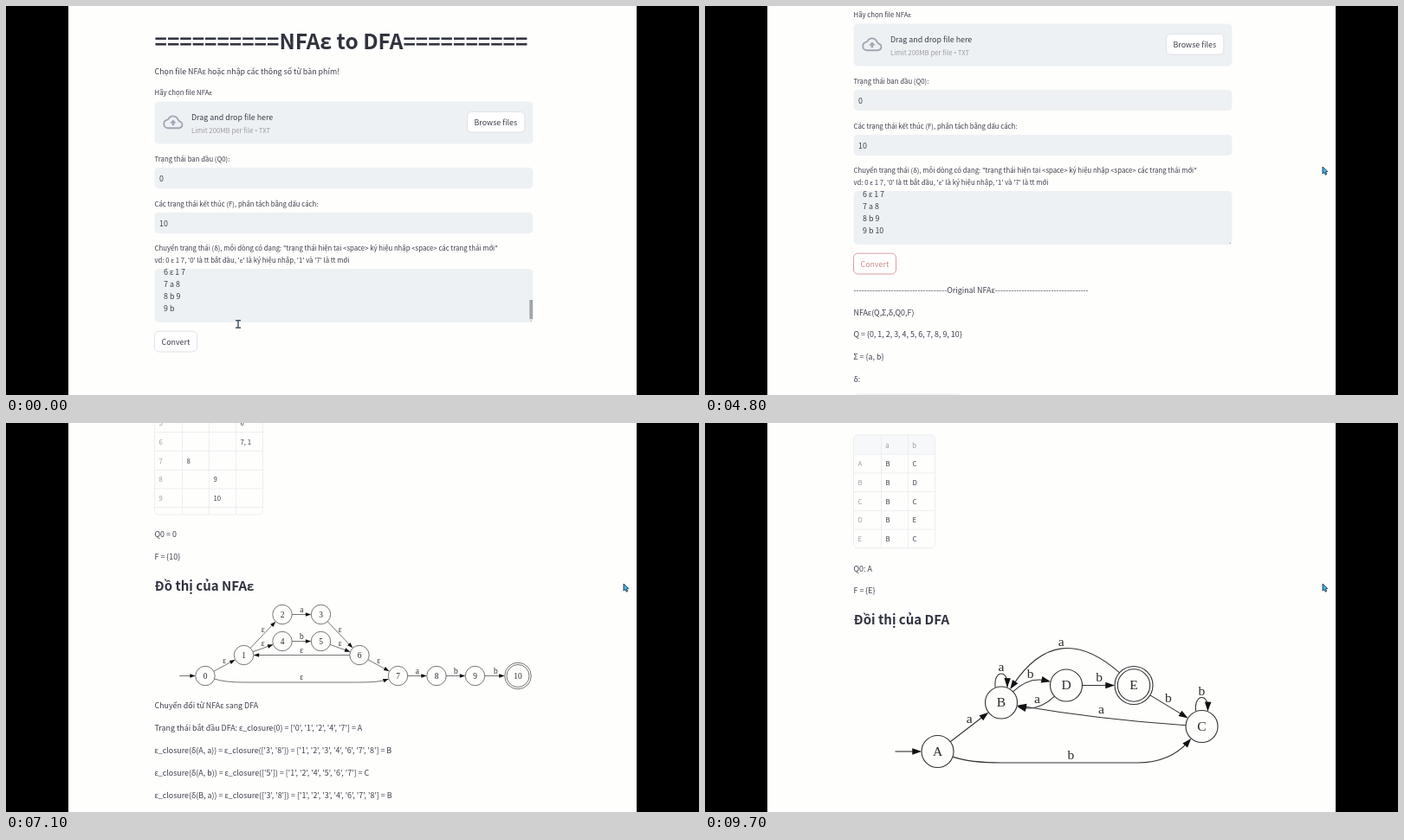
These frames come from a looping animation (800x450 px, 10000 ms). An HTML page with a canvas:

```html
<!DOCTYPE html>
<html lang="vi">
<head>
<meta charset="utf-8">
<title>NFAε to DFA</title>
<style>
html, body { margin: 0; width: 100%; height: 100%; overflow: hidden; background: #000; }
canvas { display: block; width: 800px; height: 450px; }
</style>
</head>
<body>
<canvas id="stage" width="800" height="450"></canvas>
<script>
const ctx = document.getElementById('stage').getContext('2d');

const LOOP = 10000, STEP = 100;
const SANS = '"Noto Sans CJK JP", "Noto Sans CJK SC", "Noto Sans CJK KR", "Noto Sans", sans-serif';
const GREEK = '"Noto Sans", "Open Sans", sans-serif';
const SERIF = '"Liberation Serif", serif';
const BODY = 8.88, SMALL = 7.77, LINE = 25.8, LEFT = 171.5, WIDTH = 437;
const INK = '#3c3e49', DARK = '#31333f', MUTED = '#9c9da5', FIELD = '#eef1f4';
const PAPER = '#fefefd', RULE = '#e9eaec', OUTLINE = '#d9dbe1', ACCENT = '#cb8a88';

// Key points: time followed by values
const scrollKeys = [[4540, 0], [5600, 368], [7050, 681], [7340, 681], [9500, 1425]];
const mouseKeys = [[1950, 268, 368], [2700, 188, 387], [3150, 188, 387], [3600, 701, 200.5], [4300, 712.5, 185.5]];

function at(keys, t) {
  const next = keys.findIndex(k => k[0] > t);
  if (next < 1) return keys[next ? keys.length - 1 : 0].slice(1);
  const [a, b] = [keys[next - 1], keys[next]];
  const k = (t - a[0]) / (b[0] - a[0]);
  return a.slice(1).map((v, i) => v + (b[i + 1] - v) * k);
}

// Automata: the tables, the closure steps and both graphs follow from these moves
const moves = { 0: { ε: '7, 1' }, 1: { ε: '4, 2' }, 2: { a: '3' }, 3: { ε: '6' }, 4: { b: '5' }, 5: { ε: '6' },
  6: { ε: '7, 1' }, 7: { a: '8' }, 8: { b: '9' }, 9: { b: '10' } };

const targets = (state, symbol) => moves[state]?.[symbol]?.split(', ') ?? [];
const show = set => '[' + set.map(s => `'${s}'`).join(', ') + ']';

function closure(set) {
  const all = new Set(set);
  for (const s of all) targets(s, 'ε').forEach(n => all.add(n));
  return [...all].sort();
}

function convert() {
  const found = [closure(['0'])], steps = [], rows = [];
  const nameOf = set => {
    let i = found.findIndex(f => show(f) === show(set));
    if (i < 0) i = found.push(set) - 1;
    return 'ABCDE'[i];
  };
  for (const set of found) {
    const row = [nameOf(set)];
    for (const symbol of 'ab') {
      const reached = set.flatMap(s => targets(s, symbol)).sort();
      const closed = closure(reached), name = nameOf(closed);
      steps.push(`ε_closure(δ(${row[0]}, ${symbol})) = ε_closure(${show(reached)}) = ${show(closed)} = ${name}`);
      row.push(name);
    }
    rows.push(row);
  }
  return { steps, rows };
}

const dfa = convert();
const nfaRows = Object.keys(moves).map(s => [s, ...[...'abε'].map(c => moves[s][c] ?? '')]);
const edgesOf = rows => rows.flatMap(([from, ...cells]) =>
  cells.flatMap((cell, i) => cell ? cell.split(', ').map(to => [from, to, 'abε'[i]]) : []));

// Vertically centred text; Greek letters come from a proportional face
function text(str, x, cy, size = BODY, color = INK, weight = 400) {
  ctx.fillStyle = color;
  ctx.textAlign = 'left';
  for (const part of str.split(/([\u0370-\u03ff\u2022]+)/)) {
    if (!part) continue;
    ctx.font = `${weight} ${size}px ${/[\u0370-\u03ff\u2022]/.test(part) ? GREEK : SANS}`;
    ctx.fillText(part, x, cy + size * 0.397);
    x += ctx.measureText(part).width;
  }
  return x;
}

const lines = (y, rows) => rows.forEach((s, i) => text(s, LEFT, y + LINE * i));

function box(x, y, w, h, fill, stroke) {
  ctx.beginPath();
  ctx.roundRect(x, y, w, h, 5);
  if (fill) { ctx.fillStyle = fill; ctx.fill(); }
  if (stroke) { ctx.strokeStyle = stroke; ctx.lineWidth = 0.8; ctx.stroke(); }
}

function button(str, x, y, w, color, border) {
  box(x, y, w, 23.8, '#fff', border);
  text(str, x + 8, y + 12, BODY, color);
}

const field = (y, h) => box(LEFT, y, WIDTH, h, FIELD);

function cloud(x, y) {
  ctx.save();
  ctx.translate(x, y);
  ctx.strokeStyle = ctx.fillStyle = '#a0a6b4';
  ctx.lineWidth = 1.9;
  ctx.beginPath();
  ctx.arc(-5.8, 2, 4.8, Math.PI / 2, Math.PI * 1.45);
  ctx.arc(0, -1, 6, Math.PI * 1.15, Math.PI * 1.9);
  ctx.arc(6.7, 2.9, 3.9, -Math.PI * 0.45, Math.PI / 2);
  ctx.closePath();
  ctx.stroke();
  ctx.fillRect(-1.3, 0, 2.6, 3.8);
  ctx.beginPath();
  ctx.moveTo(-3.8, 1);
  ctx.lineTo(0, -2.8);
  ctx.lineTo(3.8, 1);
  ctx.fill();
  ctx.restore();
}

function form(t) {
  const bar = '='.repeat(10), hot = t >= 2600;
  text(bar + 'NFAε to DFA' + bar, LEFT, 40.8, 24.4, DARK, 700);
  text('Chọn file NFAε hoặc nhập các thông số từ bàn phím!', LEFT, 75);
  text('Hãy chọn file NFAε', LEFT, 100.3, SMALL);
  field(110.5, 49);
  cloud(192.9, 134.4);
  text('Drag and drop file here', 214, 128);
  text('Limit 200MB per file • TXT', 214, 143.5, SMALL, MUTED);
  button('Browse files', 532.5, 122.3, 66.3, INK, OUTLINE);

  text('Trạng thái ban đầu (Q0):', LEFT, 176.6, SMALL);
  field(186.8, 24.4);
  text('0', 177, 199);
  text('Các trạng thái kết thúc (F), phân tách bằng dấu cách:', LEFT, 228.7, SMALL);
  field(238.8, 24.4);
  text('10', 177, 251);
  text('Chuyển trạng thái (δ), mỗi dòng có dạng: "trạng thái hiện tại <space> ký hiệu nhập <space> các trạng thái mới"',
    LEFT, 280.4, SMALL);
  text("vd: 0 ε 1 7, '0' là tt bắt đầu, 'ε' là ký hiệu nhập, '1' và '7' là tt mới", LEFT, 294.4, SMALL);
  editor(t);
  button('Convert', LEFT, 376.2, 49, hot ? ACCENT : INK, hot ? ACCENT : OUTLINE);
}

function editor(t) {
  field(304, 62);
  ctx.save();
  ctx.beginPath();
  ctx.rect(LEFT, 304, WIDTH, 62);
  ctx.clip();
  const typed = '9 b 10'.slice(0, t < 100 ? 3 : t < 200 ? 5 : 6);
  let end = 0;
  ['6 ε 1 7', '7 a 8', '8 b 9', typed].forEach((s, i) => { end = text(s, 182, 307.6 + 13.9 * i); });
  const blinkOn = Math.floor((t - 100) / 500) % 2 === 0;
  if (t >= 100 && t < 2000 && blinkOn) {
    ctx.fillStyle = DARK;
    ctx.fillRect(end + 0.3, 344, 0.7, 11);
  }
  ctx.restore();
  ctx.fillStyle = '#a3a5a9';
  if (t < 4300) ctx.fillRect(604.3, 340, 3.8, 22.3);
  ctx.fillRect(605.5, 364, 1.5, 1);
}

function table(y, heads, rows, height) {
  const rowH = 21.72, headH = 22.5, colX = i => i ? 172.5 + 31 * i : LEFT;
  const w = colX(heads.length + 1) - LEFT;
  height ??= headH + rowH * rows.length;
  ctx.save();
  ctx.beginPath();
  ctx.roundRect(LEFT, y, w, height, 5);
  ctx.clip();
  ctx.fillStyle = '#f7f8fa';
  ctx.fillRect(LEFT, y, w, headH);
  ctx.fillStyle = RULE;
  heads.forEach((_, i) => ctx.fillRect(colX(i + 1) - 0.4, y, 0.8, height));
  for (let i = 0; i <= rows.length; i++) ctx.fillRect(LEFT, y + headH + rowH * i - 0.4, w, 0.8);
  heads.forEach((h, i) => text(h, colX(i + 1) + 4.8, y + 12, SMALL, MUTED));
  rows.forEach((row, r) => row.forEach((cell, c) =>
    text(cell, colX(c) + 5, y + 33.5 + rowH * r, SMALL, c ? INK : MUTED)));
  ctx.restore();
  box(LEFT, y, w, height, null, RULE);
}

function results() {
  const dashes = '-'.repeat(35), title = (s, y) => text(s, LEFT, y, 15, DARK, 600);
  lines(418.2, [dashes + 'Original NFAε' + dashes, 'NFAε(Q,Σ,δ,Q0,F)',
    'Q = {0, 1, 2, 3, 4, 5, 6, 7, 8, 9, 10}', 'Σ = {a, b}', 'δ:']);
  table(539, ['a', 'b', 'ε'], nfaRows, 248);
  lines(809.8, ['Q0 = 0', 'F = {10}']);
  title('Đồ thị của NFAε', 868.8);
  graph(nfaGraph);
  lines(1007.8, ['Chuyển đổi từ NFAε sang DFA',
    `Trạng thái bắt đầu DFA: ε_closure(0) = ${show(closure(['0']))} = A`, ...dfa.steps,
    dashes + 'Converted DFA' + dashes, 'DFA(Q,Σ,δ,Q0,F)', 'Q = {A, B, C, D, E}', 'Σ = {a, b}', 'δ:']);
  table(1438.7, ['a', 'b'], dfa.rows);
  lines(1593, ['Q0: A', 'F = {E}']);
  title('Đồi thị của DFA', 1652);
  graph(dfaGraph);
}

// Graphs: bends are in node radii, positive to the left of travel; runs are level stretches at a given height
const column = (i, y) => [230 + 44.5 * i, y];
const nfaGraph = {
  top: 681, r: 11.2, start: '0', final: '10', finalR: 15.3, edges: edgesOf(nfaRows), bends: {}, runs: { 0: 300 },
  nodes: { 0: column(0, 292.5), 1: column(1, 268.5), 2: column(2, 221.5), 3: column(3, 221.5),
    4: column(2, 252.5), 5: column(3, 252.5), 6: column(4, 268.5), 7: column(5, 292.5),
    8: column(6, 292.5), 9: column(7, 292.5), 10: [591, 292.5] }
};
nfaGraph.runs = { '0-7': 300 };
const dfaGraph = {
  top: 1425, r: 18.5, start: 'A', final: 'E', finalR: 22, edges: edgesOf(dfa.rows),
  bends: { 'B-D': 1.13, 'D-B': 1.13, 'E-B': -4.8, 'C-B': 0.33 }, runs: { 'A-C': 393 },
  nodes: { A: [268.5, 380], B: [342, 323.5], C: [573.5, 351], D: [417, 303.5], E: [495, 303.5] }
};

function ring(x, y, r) {
  ctx.beginPath();
  ctx.arc(x, y, r, 0, Math.PI * 2);
  ctx.stroke();
}

function label(str, x, y, size) {
  ctx.font = `${size}px ${SERIF}`;
  ctx.textAlign = 'center';
  ctx.fillStyle = '#2a2a2a';
  ctx.fillText(str, x, y + size * 0.32);
}

function head([x, y], [fromX, fromY], size) {
  ctx.save();
  ctx.translate(x, y);
  ctx.rotate(Math.atan2(y - fromY, x - fromX));
  ctx.beginPath();
  ctx.moveTo(0, 0);
  ctx.lineTo(-size, -size * 0.35);
  ctx.lineTo(-size, size * 0.35);
  ctx.fillStyle = '#111';
  ctx.fill();
  ctx.restore();
}

// Point at distance r from p, in the direction of q
function toward(p, q, r) {
  const d = Math.hypot(q[0] - p[0], q[1] - p[1]);
  return p.map((v, i) => v + (q[i] - v) * r / d);
}

function graph({ top, r, start, final, finalR, edges, bends, runs, nodes }) {
  const size = r * 0.58, font = r * 0.84;
  const radius = n => n === final ? finalR : r;

  // Quadratic curve, or two of them joined by a level run
  function edge(from, to, str) {
    const a = nodes[from], b = nodes[to], key = `${from}-${to}`, level = runs[key];
    const bend = (bends[key] ?? 0) * r / Math.hypot(b[0] - a[0], b[1] - a[1]);
    const mid = [(a[0] + b[0]) / 2 + (b[1] - a[1]) * bend, (a[1] + b[1]) / 2 - (b[0] - a[0]) * bend];
    const out = level ? [a[0] + 2 * r, level] : mid, into = level ? [b[0] - 2 * r, level] : mid;
    const p = toward(a, out, radius(from)), q = toward(b, into, radius(to));
    const end = toward(q, into, size * 0.5);
    ctx.beginPath();
    ctx.moveTo(...p);
    if (level) {
      ctx.quadraticCurveTo(...out, a[0] + 4 * r, level);
      ctx.lineTo(b[0] - 4 * r, level);
    }
    ctx.quadraticCurveTo(...into, ...end);
    ctx.stroke();
    head(q, into, size);
    const y = level ?? (p[1] + q[1] + 2 * mid[1]) / 4;
    label(str, (p[0] + q[0] + 2 * mid[0]) / 4, y - r * 0.5, font);
  }

  function loop(name, str) {
    const [x, y] = nodes[name], dx = r * 0.37, foot = y - r * 0.95, high = y - r * 2.1;
    ctx.beginPath();
    ctx.moveTo(x - dx, foot);
    ctx.bezierCurveTo(x - dx * 1.4, high, x + dx * 1.4, high, x + dx, foot);
    ctx.stroke();
    head([x + dx, foot], [x + dx * 1.1, high], size);
    label(str, x, y - r * 2.23, font);
  }

  ctx.save();
  ctx.translate(0, top);
  ctx.strokeStyle = '#333';
  ctx.lineWidth = r * 0.06;
  const [x0, y0] = nodes[start];
  ctx.beginPath();
  ctx.moveTo(x0 - r * 2.65, y0);
  ctx.lineTo(x0 - r * 1.2, y0);
  ctx.stroke();
  head([x0 - r, y0], [0, y0], size);
  for (const [from, to, str] of edges) from === to ? loop(from, str) : edge(from, to, str);
  for (const [name, [x, y]] of Object.entries(nodes)) {
    ring(x, y, radius(name));
    if (name === final) ring(x, y, finalR * 0.85);
    label(name, x, y, font);
  }
  ctx.restore();
}

// Mouse pointers
const ARROW = new Path2D('M.5 .5V8.6L2.4 7 3.8 9.8 5.2 9.1 4 6.5 6.3 6Z');
const HAND = new Path2D('M-1 0H1V4L5 5V9L3.5 12H-1.5L-4 7.5 -1 7Z');
const BEAM = new Path2D('M-3 -4.2H3M0 -4.2V4.2M-3 4.2H3');

function pointer(t) {
  ctx.save();
  ctx.translate(...at(mouseKeys, t));
  ctx.lineJoin = 'round';
  if (t < 2200) {
    ctx.strokeStyle = '#4b5866';
    ctx.lineWidth = 1.5;
    ctx.stroke(BEAM);
  } else {
    const shape = t >= 2600 && t < 3200 ? HAND : ARROW;
    ctx.fillStyle = '#45b4e4';
    ctx.strokeStyle = '#1f4560';
    ctx.lineWidth = 1;
    ctx.fill(shape);
    ctx.stroke(shape);
  }
  ctx.restore();
}

function draw(t) {
  ctx.fillStyle = '#000';
  ctx.fillRect(0, 0, 800, 450);
  ctx.fillStyle = PAPER;
  ctx.fillRect(72, 0, 656, 450);
  ctx.save();
  ctx.translate(0, -Math.round(at(scrollKeys, t)[0]));
  form(t);
  if (t >= 3200) results();
  ctx.restore();
  pointer(t);
}

function frame() {
  draw(Math.floor((performance.now() % LOOP) / STEP) * STEP);
  requestAnimationFrame(frame);
}
frame();
</script>
</body>
</html>
```
